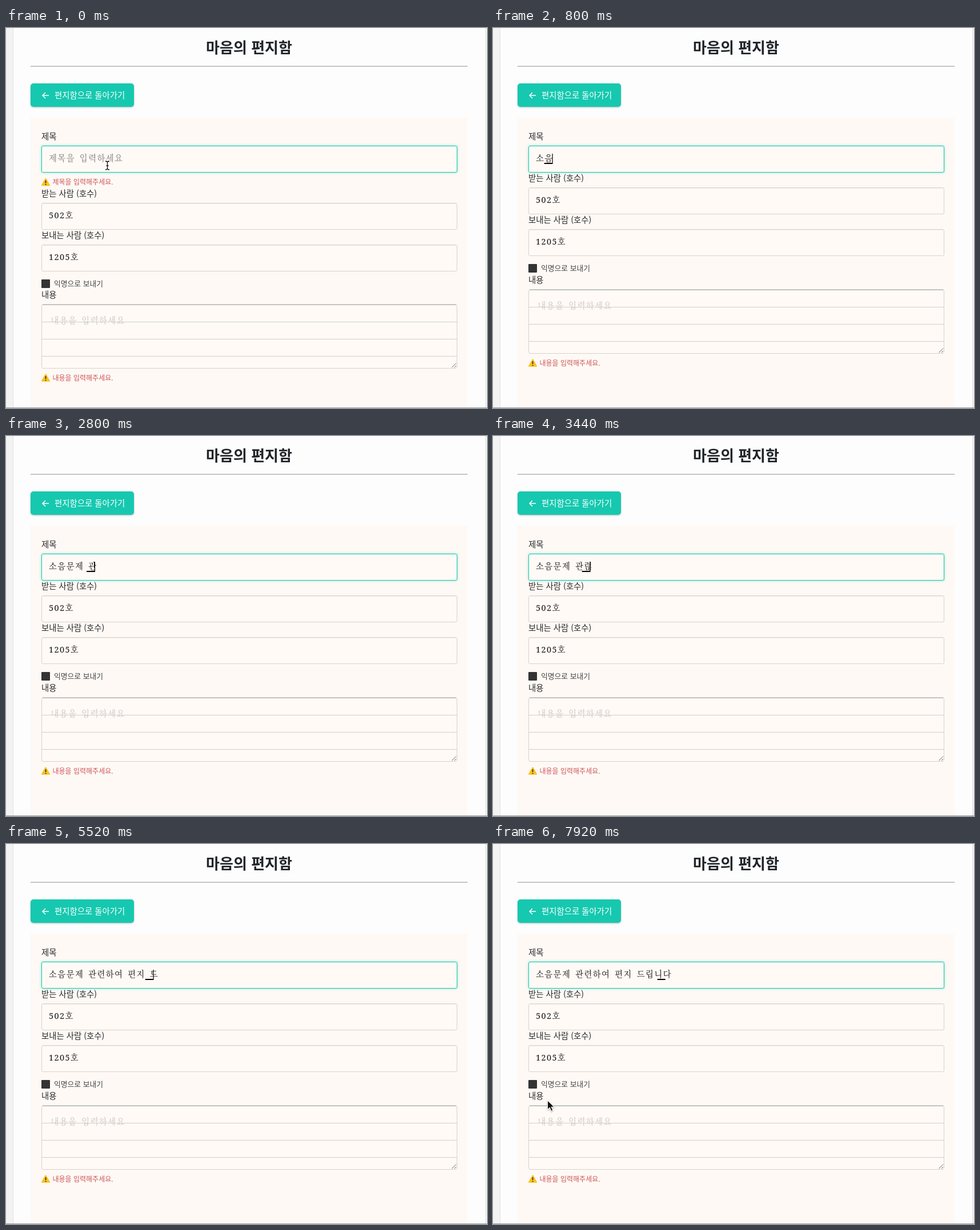
An HTML page that plays this animation: 842x665 px, repeating every 8000 ms.

```html
<!DOCTYPE html>
<html lang="ko">
<head>
<meta charset="utf-8">
<title>마음의 편지함</title>
<style>
  html, body { margin: 0; width: 100%; height: 100%; overflow: hidden; background: #fdfdfd; }
  svg { display: block; width: 842px; height: 665px; }
  text { font: 14.4px "Noto Sans CJK KR", "Noto Sans CJK", sans-serif; fill: #2b2b2b; white-space: pre; }
  .heading { font-size: 26px; font-weight: 700; fill: #212529; text-anchor: middle; }
  .button { fill: #fff; font-weight: 300; }
  .small { font-size: 12.8px; fill: #444; }
  .error { font-size: 12px; fill: #cf5558; }
  .letter {
    font-family: "Noto Serif", "Noto Serif CJK KR", "Noto Sans CJK KR", "Noto Sans CJK", serif;
    font-weight: 300; letter-spacing: 1.42px; word-spacing: 2.69px; fill: #111;
  }
  .digits { font-weight: 400; }
  .hint { fill: #777; }
  .faint { fill: #c6c2bf; }
  .box { fill: #fffaf6; stroke: #d6d2ce; }
  .focus { stroke: #18c8ad; filter: drop-shadow(0 0 2px #18c8ad88); }
  .start { animation: start 8s step-end infinite; }
  .fields { animation: fields 8s step-end infinite; }
  .content { animation: content 8s step-end infinite; }
  @keyframes start { 0% { visibility: visible; } 1%, 100% { visibility: hidden; } }
  @keyframes fields { 0% { transform: translateY(27px); } 1%, 100% { transform: none; } }
  @keyframes content { 0% { transform: translateY(26px); } 1%, 100% { transform: none; } }
</style>
</head>
<body>
<svg viewBox="0 0 842 665">
  <defs>
    <g id="warning">
      <path d="M7.5 1 14.3 13H.7Z" fill="#fbc21f" stroke="#fbc21f" stroke-width="1.6" stroke-linejoin="round"/>
      <path d="M7.5 4.3v4.6M7.5 10.6v1.6" stroke="#30302c" stroke-width="1.8"/>
    </g>
    <filter id="shadow" x="-10%" y="-20%" width="120%" height="150%">
      <feDropShadow dx="0" dy="1" stdDeviation="1.5" flood-opacity=".25"/>
    </filter>
  </defs>

  <path d="M0 0H12V665H0ZM840 0H842V665H840Z" fill="#f3f3f3"/>
  <path d="M12.5 0V665M839.5 0V665" stroke="#e2e2e2"/>
  <text class="heading" x="425.5" y="44">마음의 편지함</text>
  <path d="M43 67H808" stroke="#b5b5b5" stroke-width="1.6"/>

  <rect x="43" y="97" width="181" height="41" rx="5" fill="#13c8af" filter="url(#shadow)"/>
  <path d="M75 118H64.5M69 113l-5 5 5 5" fill="none" stroke="#fff" stroke-width="1.5"/>
  <text class="button" x="85" y="122.5">편지함으로 돌아가기</text>

  <rect x="43" y="157" width="765" height="508" fill="#fef9f5"/>
  <text x="62" y="195">제목</text>
  <rect class="box focus" x="62.5" y="206.5" width="727" height="46" rx="2.5"/>

  <g class="start">
    <text class="letter hint" x="75" y="233">제목을 입력하세요</text>
    <use href="#warning" x="62" y="262.5"/>
    <text class="error" x="81.5" y="274">제목을 입력해주세요.</text>
    <g fill="none">
      <path id="beam" d="M174 233q3 0 3.5 2 .5-2 3.5-2M177.5 235v11M174 248q3 0 3.5-2 .5 2 3.5 2M175.5 241h4" stroke="#fff" stroke-width="3"/>
      <use href="#beam"/>
      <path d="M174 233q3 0 3.5 2 .5-2 3.5-2M177.5 235v11M174 248q3 0 3.5-2 .5 2 3.5 2M175.5 241h4" stroke="#111" stroke-width="1.3"/>
    </g>
  </g>

  <g class="fields">
    <text x="62" y="268">받는 사람 (호수)</text>
    <rect class="box" x="62.5" y="279.5" width="727" height="46" rx="2.5"/>
    <path d="M64 280.5H788" stroke="#f0ebe7"/>
    <text class="letter digits" x="75" y="306">502호</text>
    <text x="62" y="341">보내는 사람 (호수)</text>
    <rect class="box" x="62.5" y="352.5" width="727" height="46" rx="2.5"/>
    <path d="M64 353.5H788" stroke="#f0ebe7"/>
    <text class="letter digits" x="75" y="379">1205호</text>
    <rect x="62" y="413" width="15" height="15" rx="1" fill="#333"/>
    <text class="small" x="84" y="425">익명으로 보내기</text>
  </g>

  <g class="content">
    <text x="62" y="446">내용</text>
    <rect class="box" x="62.5" y="458" width="727" height="111.5" rx="2.5"/>
    <path d="M64 458.3H788" stroke="#b9b6b3" stroke-width="1.4"/>
    <text class="letter faint" x="78.5" y="491">내용을 입력하세요</text>
    <path d="M63 488.5H789M63 518.5H789M63 548.5H789" stroke="#d2cecb"/>
    <path d="M780.5 568l7.5-7.5M785 568l3-3" stroke="#666"/>
    <use href="#warning" x="62" y="579"/>
    <text class="error" x="81.5" y="590.5">내용을 입력해주세요.</text>
  </g>

  <text id="typed" class="letter" x="75" y="233"></text>
  <rect id="underline" y="236" width="14" height="2"/>
  <rect id="caret" y="220" width="1.2" height="18"/>
  <path id="pointer" d="M0 0V16.5L3.8 13 6.4 19 9.4 17.7 6.8 11.9H12Z" fill="#111" stroke="#fff" stroke-width="1.1"
    style="filter: drop-shadow(0 1px 1px #0005)"/>
  <path d="M0 664.5H842" stroke="#9b9b9b"/>
</svg>
<script>
  const LOOP = 8000, LEFT = 75, SYLLABLE = 14.67, SPACE = 7.33, CARET_ON = 480;
  const sentence = '소음문제 관련하여 편지 드립니다';
  // [time, finished characters, syllable being composed]
  const keys = [
    [0, 0, ''], [80, 0, 'ㅅ'], [240, 0, '소'], [400, 0, '송'], [560, 1, '으'], [720, 1, '음'],
    [1360, 2, 'ㅁ'], [1520, 2, '무'], [1680, 2, '문'], [1840, 2, '묹'], [2000, 3, '제'], [2240, 5, ''],
    [2400, 5, 'ㄱ'], [2560, 5, '고'], [2640, 5, '과'], [2800, 5, '관'],
    [2960, 6, 'ㄹ'], [3120, 6, '려'], [3280, 6, '련'], [3440, 6, '렪'], [3520, 7, '하'],
    [3680, 7, '항'], [3760, 8, '여'], [3920, 10, ''],
    [4240, 10, 'ㅍ'], [4400, 10, '펴'], [4560, 10, '편'], [4720, 10, '펹'], [4800, 11, '지'], [4960, 13, ''],
    [5200, 13, 'ㄷ'], [5440, 13, '드'], [5760, 13, '들'], [6000, 14, '리'], [6320, 14, '립'],
    [6720, 15, 'ㄴ'], [6880, 15, '니'], [7040, 15, '닏'], [7120, 16, '다'],
  ];
  const [typed, underline, caret, pointer] =
    ['typed', 'underline', 'caret', 'pointer'].map(id => document.getElementById(id));

  const widthOf = text => [...text].reduce((sum, c) => sum + (c === ' ' ? SPACE : SYLLABLE), 0);
  const show = (el, on) => el.setAttribute('visibility', on ? 'visible' : 'hidden');

  function draw() {
    const t = performance.now() % LOOP;
    const [time, count, syllable] = keys.findLast(key => key[0] <= t);
    const done = sentence.slice(0, count);
    const start = LEFT + widthOf(done);
    typed.textContent = done + syllable;
    underline.setAttribute('x', start);
    show(underline, syllable);
    caret.setAttribute('x', start + widthOf(syllable) - 0.9);
    const blink = Math.floor((t - time) / CARET_ON) % 2 === 0;
    show(caret, time > 0 && blink);

    const p = Math.min(1, Math.max(0, (t - 7680) / 240));
    const rest = (1 - p) ** 2;
    pointer.setAttribute('transform', `translate(${95.5 + 55 * rest} ${448.5 - 150 * rest})`);
    show(pointer, t >= 7680);
    requestAnimationFrame(draw);
  }
  draw();
</script>
</body>
</html>
```
